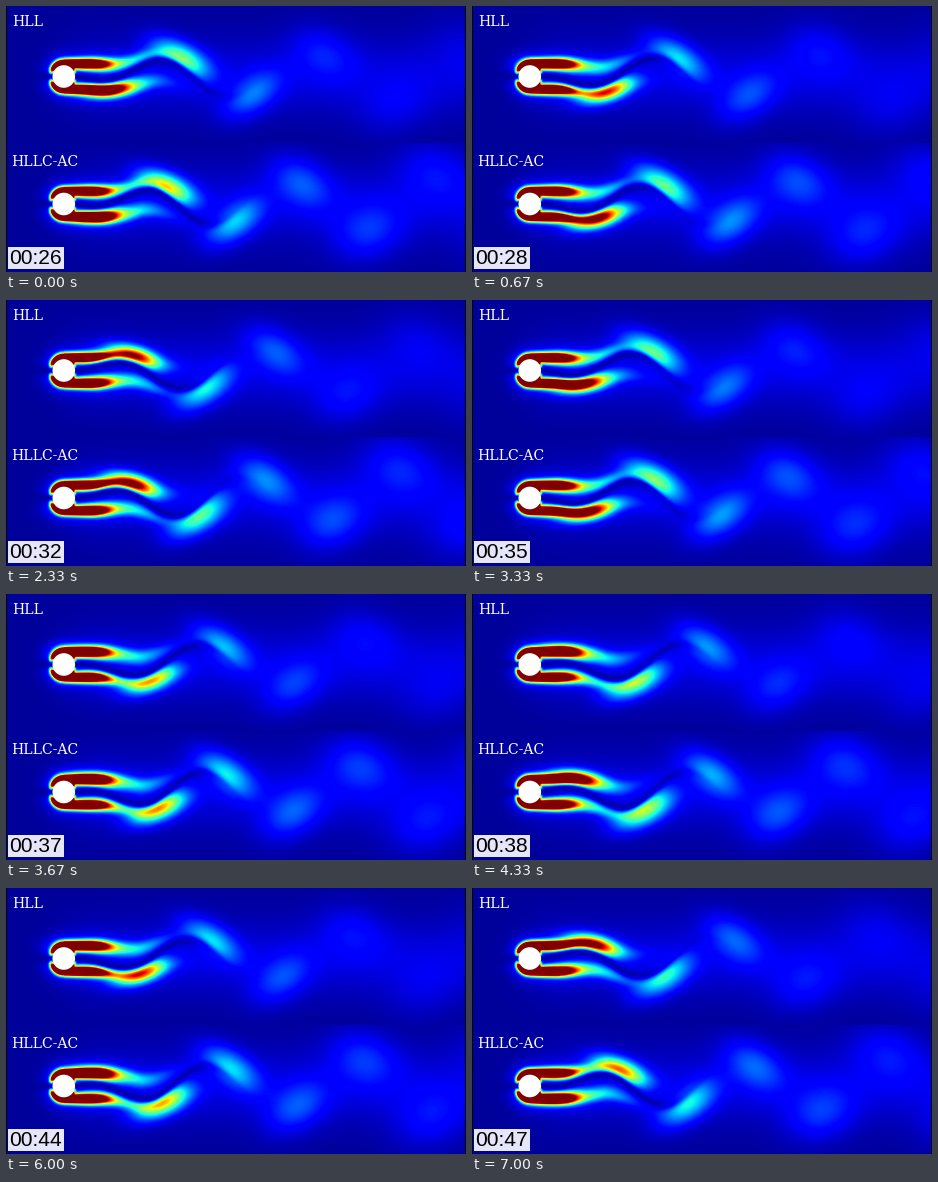
These frames come from a looping animation (460 px wide and 266 px high, 7.33 s). A matplotlib script:

```python
import numpy as np
import matplotlib.pyplot as plt
from matplotlib.animation import FuncAnimation
from matplotlib.patches import Circle, Rectangle

W, H, DPI = 460, 266, 64  # a power of two keeps the pixel size exact
FRAMES, LOOP = 22, 7330
CX, RADIUS, SPLIT = 57.8, 11.3, 137

# Wake travel in px at key steps; the flow speeds up slightly.
STEPS = [0, 4, 7, 10, 13, 16, 21]
WAKES = [
    dict(cy=70.5, x0=175, period=142, rows=slice(0, SPLIT),
         travel=[0, 60, 111, 165, 219, 275, 371],
         amp_x=[55, 90, 106, 125, 143, 175, 210, 240, 300, 400, 480],
         amp=[0, .5, .85, .75, .52, .42, .26, .19, .10, .045, .03]),
    dict(cy=198, x0=161, period=134, rows=slice(SPLIT, H),
         travel=[0, 60, 117, 173, 231, 292, 389],
         amp_x=[55, 90, 106, 125, 145, 160, 180, 210, 240, 290, 360, 480],
         amp=[0, .5, .85, .8, .6, .54, .44, .33, .22, .15, .12, .06]),
]


def sigmoid(z):
    return 1 / (1 + np.exp(-np.clip(z, -50, 50)))


def vortex(x, y, wake, xb, sign):
    """Sheared Gaussian that widens as it drifts downstream."""
    amp = np.interp(xb, wake["amp_x"], wake["amp"])
    rise = np.interp(xb, [90, 140, 172, 210, 250, 310, 400],
                     [11, 14, 18, 18, 18, 23, 32])
    sx = np.interp(xb, [100, 140, 175, 235, 300, 400],
                   [15, 17, 19, 19, 21, 25])
    sy = np.interp(xb, [100, 140, 175, 235, 300, 400],
                   [5.5, 8, 11, 13.5, 17, 20])
    slope = np.interp(xb, [100, 150, 200, 260, 340], [.1, .3, .45, .4, .15])
    dx = x - xb
    dy = y + sign * rise - sign * slope * dx
    return amp * np.exp(-dx**2 / (2 * sx**2) - dy**2 / (2 * sy**2))


def shear_layer(x, y, mid, sign):
    """Sheet that wraps the cylinder nose and trails behind it."""
    r = np.hypot(x - CX, y)
    ramp = np.clip((x - 85) / 50, 0, 1)
    edge = 13.2 - sign * .5 * mid * ramp
    d = np.where(x < CX, r - 13, sign * -y - edge)
    side = np.abs(y) / np.maximum(r, 1)
    grow = np.clip((x - CX) / 60, 0, 1.3)
    outer = np.where(x < CX, 1.8 + 2.2 * side, 4 + 1.5 * grow)
    inner = np.where(x < CX, 4, 5 + 2 * grow)
    s = np.where(d > 0, outer, inner)
    strength = 1.5 * sigmoid((99 - x) / 7) + .25 * sigmoid((150 - x) / 12)
    strength = strength * np.where(x < CX, .5 + .5 * side, 1)
    rim = .8 * np.exp(-((r - 11.5) / 1.6)**2) * (x > CX)
    halo = .09 * np.exp(-(d / 11)**2) * sigmoid((150 - x) / 15)
    return strength * np.exp(-(d / s)**2) + rim + halo


def wake_field(wake, step):
    y, x = np.mgrid[wake["rows"], 0:W].astype(float)
    y = y + .5 - wake["cy"]
    x = x + .5
    period = wake["period"]
    head = wake["x0"] + np.interp(step, STEPS, wake["travel"])

    # Meandering line that parts the two rows of vortices.
    swing = np.interp(x, [70, 90, 120, 150, 200], [0, 4, 10, 16, 20])
    mid = -swing * np.cos(2 * np.pi * (x - head + 25) / period)
    near = sigmoid((212 - x) / 14)

    total = .025 + .06 * np.exp(-(y / 38)**2) * sigmoid((x - 60) / 12)
    total = total * (1 - .5 * near * np.exp(-((y - mid) / 4)**2) * (x > CX))
    for sign in (1, -1):
        start = head + (0 if sign > 0 else period / 2)
        part = shear_layer(x, y, mid, sign)
        for k in range(-5, 4):
            xb = start + k * period
            if 55 < xb < 520:
                part = part + vortex(x, y, wake, xb, sign)
        gap = np.maximum(sign * (mid - y), 0)
        mask = 1 - np.exp(-(gap / 5.5)**2)
        total = total + part * (1 - near * (1 - mask))
    return total


def picture(step):
    field = np.vstack([wake_field(w, step) for w in WAKES])
    rgb = plt.cm.jet(np.clip(field, 0, 1))[..., :3]
    rgb[:, 0] = rgb[:, -1] = 0
    return rgb


def px(size):
    return size * 72 / DPI


fig = plt.figure(figsize=(W / DPI, H / DPI), dpi=DPI)
ax = fig.add_axes([0, 0, 1, 1])
image = ax.imshow(picture(0), extent=(0, W, H, 0), interpolation="nearest",
                  aspect="auto")
ax.set_xlim(0, W)
ax.set_ylim(H, 0)
ax.axis("off")

for wake in WAKES:
    ax.add_patch(Circle((CX, wake["cy"]), RADIUS, fc="white", lw=0))
for label, left, base in (("HLL", 6.5, 20), ("HLLC-AC", 5.5, 160.5)):
    ax.text(left, base, label, color="white", family="DejaVu Serif",
            size=px(14), va="baseline")
ax.add_patch(Rectangle((2, 241), 56, 22, fc="#e6e6fa", lw=0))
clock = ax.text(3, 258.5, "", color="black", family="Liberation Sans",
                size=px(21), va="baseline")


def update(step):
    image.set_data(picture(step))
    clock.set_text(f"00:{26 + step}")
    return image, clock


anim = FuncAnimation(fig, update, frames=FRAMES, interval=LOOP / FRAMES,
                     repeat=True, repeat_delay=0, blit=False)
plt.show()
```
